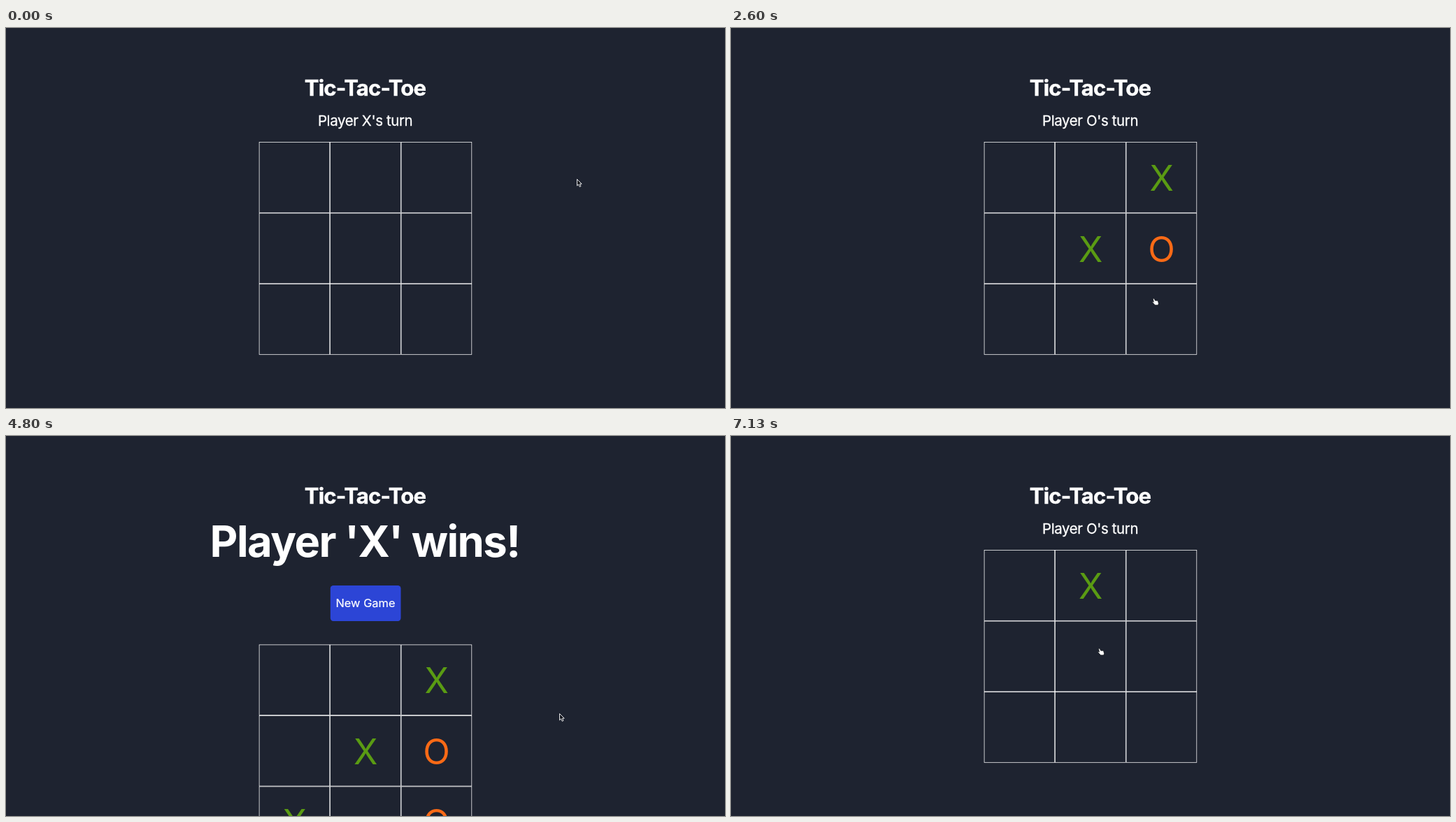
Write an HTML page that moves like this. It is 1028 px wide and 544 px high and loops after 8000 ms.

```html
<!DOCTYPE html>
<html lang="en">
<head>
<meta charset="utf-8">
<title>Tic-Tac-Toe</title>
<style>
  html, body { margin: 0; width: 100%; height: 100%; overflow: hidden; background: #1e2330; }
  svg { display: block; width: 1028px; height: 544px; }
  text {
    font-family: Inter, Roboto, sans-serif; font-optical-sizing: none;
    text-anchor: middle; fill: #fff; white-space: pre;
  }
  .title { font-size: 31.2px; font-weight: 700; letter-spacing: -.028em; stroke: #fff; stroke-width: .4; }
  .status { font-size: 20.5px; letter-spacing: -.02em; stroke: #fff; stroke-width: .3; }
  .win { font-size: 61.5px; font-weight: 700; letter-spacing: -.025em; }
  .label { font-size: 16.4px; stroke: #fff; stroke-width: .2; }
  .mark { font-size: 50.5px; }
  .cell { fill: none; stroke: #fff; stroke-width: .75; }
</style>
</head>
<body>
<svg viewBox="0 0 1028 544">
  <text class="title" x="513.6" y="97">Tic-Tac-Toe</text>
  <text class="status" id="status" x="513.6" y="139.5"></text>
  <g id="banner">
    <text class="win" x="513" y="173">Player 'X' wins!</text>
    <rect x="463.8" y="214" width="100.7" height="51" rx="4.2" fill="#2c45d6"/>
    <text class="label" x="514" y="245.3">New Game</text>
  </g>
  <g id="board"></g>
  <g id="cursor">
    <path id="arrow" d="M.5 .5V9.8L2.6 7.8 4.2 11.3 5.9 10.5 4.4 7.2H7.2Z"
      fill="#11141c" stroke="#fff" stroke-width=".9"/>
    <path id="hand" d="M-1.5 .6C-.6-.3 .3 .4 .7 1.2L1.7 3.2 5.5 3.3 6.6 7.4 5.8 9.8H1.6L-2.4 5.6C-2.5 4.7-1.4 4.6-.4 5.4Z"
      fill="#fff" stroke="#0b0d12" stroke-width=".7"/>
  </g>
</svg>
<script>
const LOOP = 8000, TICK = 1000 / 15;
const LEFT = 361.7, TOP = 163.2, SIZE = 101.5, DROP = 135.3;
const $ = id => document.getElementById(id);

// The session is scripted as gestures, timed in ticks
const glides = [], clicks = [];
let now = 0, spot = [816, 216];

const wait = ticks => now += ticks;

// Glide to (x, y); (bendX, bendY) pulls the middle of the way aside
function glide(ticks, x, y, bendX = 0, bendY = 0) {
  const control = [(spot[0] + x) / 2 + bendX, (spot[1] + y) / 2 + bendY];
  glides.push({ start: now, ticks, from: spot, control, to: [x, y] });
  spot = [x, y];
  now += ticks;
}

const click = action => clicks.push({ at: wait(1), action });

glide(8, 629, 207, 0, 40);
click(2);
wait(7);
glide(7, 635, 318, 90);
click(5);
wait(2);
glide(7, 528, 322, 0, 32);
click(4);
wait(2);
glide(4, 619, 399);
wait(2);
glide(2, 631, 410);
click(8);
wait(3);
glide(8, 416, 410);
click(6);
glide(10, 791, 397, 0, 30);
wait(5);
glide(9, 523, 250, -257, -394);
click('new game');
wait(4);
glide(3, 523, 228);
click(1);
glide(5, 527, 362);
glide(6, 527, 304);

function pointerAt(tick) {
  const { start, ticks, from, control, to } = glides.findLast(g => g.start <= tick);
  const u = Math.min(1, (tick - start) / ticks), s = u * u * (3 - 2 * u), r = 1 - s;
  return from.map((p, i) => r * r * p + 2 * r * s * control[i] + s * s * to[i]);
}

function movesAt(tick) {
  const done = clicks.filter(c => c.at <= tick).map(c => c.action);
  return done.slice(done.indexOf('new game') + 1);
}

function add(name, attrs) {
  const el = document.createElementNS('http://www.w3.org/2000/svg', name);
  for (const key in attrs) el.setAttribute(key, attrs[key]);
  return $('board').appendChild(el);
}

const marks = Array.from({ length: 9 }, (_, i) => {
  const x = LEFT + i % 3 * SIZE, y = TOP + Math.floor(i / 3) * SIZE;
  add('rect', { class: 'cell', x: x + .4, y: y + .4, width: SIZE - .8, height: SIZE - .8 });
  return add('text', { class: 'mark', x: x + SIZE / 2 + .2, y: y + 69.8 });
});

const inside = (x, y, l, t, w, h) => x >= l && x <= l + w && y >= t && y <= t + h;
const show = (el, on) => el.setAttribute('visibility', on ? 'visible' : 'hidden');

function draw(tick) {
  const moves = movesAt(tick), won = moves.length === 5, drop = won ? DROP : 0;

  marks.forEach((el, cell) => {
    const turn = moves.indexOf(cell);
    el.textContent = turn < 0 ? '' : 'XO'[turn % 2];
    el.style.fill = turn % 2 ? '#fa6a16' : '#5a9b13';
  });
  $('status').textContent = `Player ${'XO'[moves.length % 2]}'s turn`;
  show($('status'), !won);
  show($('banner'), won);
  $('board').setAttribute('transform', `translate(0 ${drop})`);

  const [x, y] = pointerAt(tick);
  const hand = inside(x, y, LEFT, TOP + drop, 3 * SIZE, 3 * SIZE) ||
    won && inside(x, y, 464, 214, 100, 51);
  $('cursor').setAttribute('transform', `translate(${x} ${y})`);
  show($('hand'), hand);
  show($('arrow'), !hand);
}

const begin = performance.now();
function frame() {
  const time = (performance.now() - begin) % LOOP;
  draw(Math.floor((time + 4) / TICK));  // small lead absorbs frame rounding
  requestAnimationFrame(frame);
}
frame();
</script>
</body>
</html>
```
